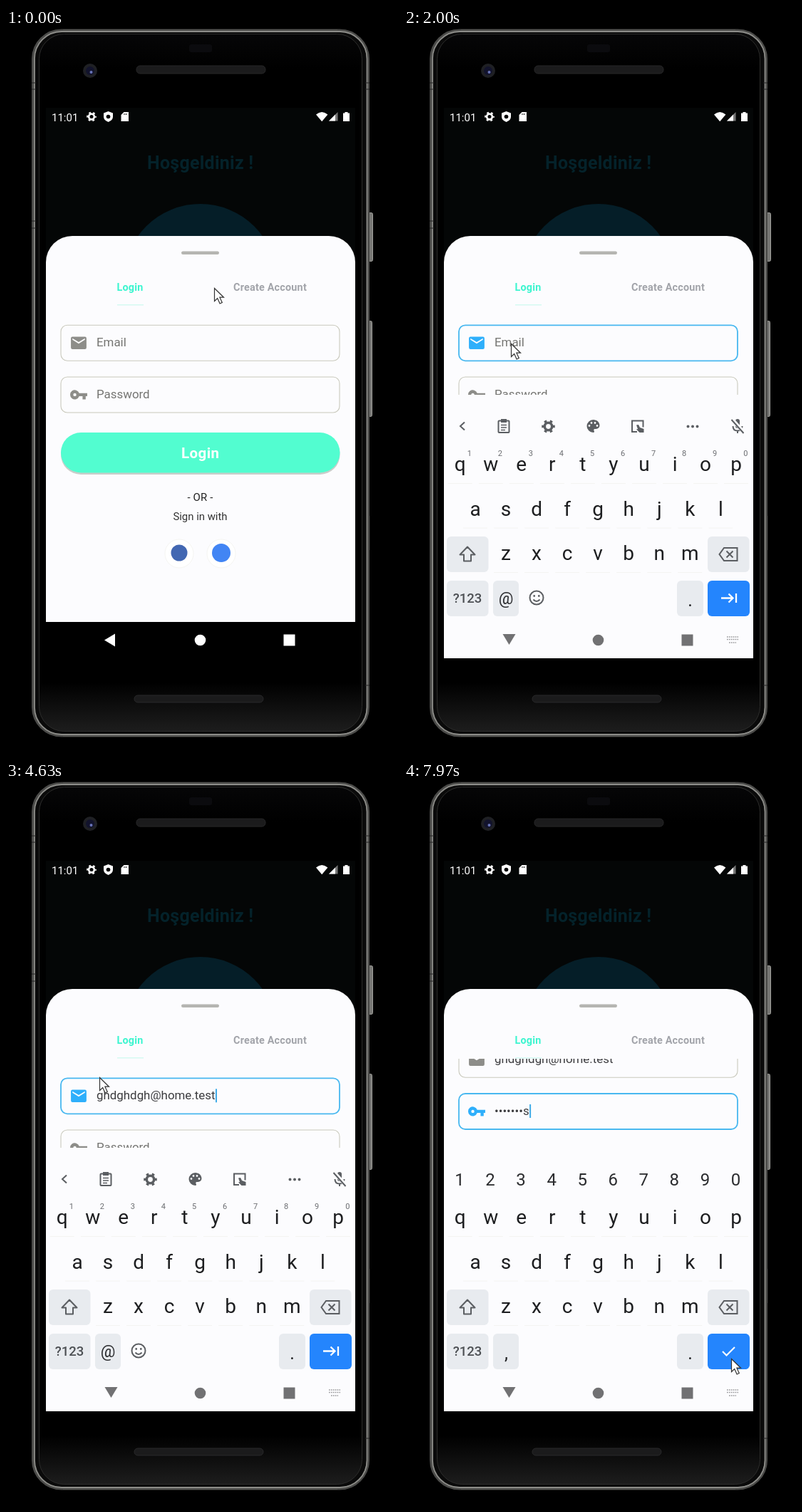
Recreate the animation shown at these times as an HTML page. Size 550x1018 px, loop 8000 ms.

```html
<!DOCTYPE html>
<html lang="en">
<head>
<meta charset="utf-8">
<title>Login form</title>
<style>
  html, body { margin: 0; width: 100%; height: 100%; overflow: hidden; background: #000; }
  svg { display: block; width: 550px; height: 1018px; font-family: Roboto, sans-serif; }
  text { white-space: pre; }
  .mid { text-anchor: middle; }
  .tab { font-size: 14.4px; font-weight: 700; letter-spacing: .2px; }
  .input { font-size: 16.9px; }
  .hint { fill: #757572; }
  .typed { fill: #3c3c3f; }
  .key { font-size: 28px; fill: #1d1e20; }
  .digit { font-size: 11px; fill: #6a6c70; }
  .num { font-size: 24px; fill: #2b2c2f; }
  .line { fill: none; stroke: #5b5e62; stroke-width: 2; }
</style>
</head>
<body>
<svg viewBox="0 0 550 1018">
  <defs>
    <linearGradient id="glass" x1="0" y1="0" x2="0" y2="1">
      <stop offset="0" stop-color="#060607"/><stop offset=".05" stop-color="#000"/>
      <stop offset=".93" stop-color="#000"/><stop offset="1" stop-color="#1d1d1d"/>
    </linearGradient>
    <clipPath id="screen"><rect x="56" y="112" width="434" height="773"/></clipPath>
    <clipPath id="form"><rect x="56" y="390" width="434" height="444"/></clipPath>
    <path id="mail" d="M20 4H4a2 2 0 0 0-2 2v12a2 2 0 0 0 2 2h16a2 2 0 0 0 2-2V6a2 2 0 0 0-2-2zm0 4l-8 5-8-5V6l8 5 8-5z"/>
    <path id="lock" d="M12.65 10A6 6 0 1 0 12.65 14H17v4h4v-4h2v-4zM7 14a2 2 0 1 1 0-4 2 2 0 0 1 0 4z"/>
    <g id="gear" fill="none" stroke="currentColor">
      <circle r="5.2" stroke-width="3.6"/>
      <circle r="7.8" stroke-width="3" pathLength="12" stroke-dasharray=".9 1.1" stroke-dashoffset=".45"/>
    </g>
  </defs>

  <!-- phone -->
  <g fill="#777774" stroke="#a2a29e">
    <rect x="508.500" y="259.500" width="6" height="68" rx="2"/>
    <rect x="508.500" y="411.500" width="5" height="134" rx="2"/>
    <rect x="508" y="685" width="2.500" height="48" fill="#2a2a2a" stroke="none"/>
  </g>
  <rect x="38" y="3.500" width="470" height="990" rx="40" fill="#0a0a0a" stroke="#4b4b49" stroke-width="4"/>
  <rect x="40" y="5" width="466.500" height="987" rx="38" fill="none" stroke="#8d8d89" stroke-width="1.800"/>
  <rect x="46.500" y="8.500" width="453" height="979" rx="35" fill="url(#glass)" stroke="#2c2c2b"/>
  <path d="M80 2.500H465M80 994.500H465" stroke="#5a5a57"/>
  <path d="M36 77h6M36 86h6M36 271h6M36 281h6M504 77h6M504 86h6M504 923h6" stroke="#222"/>
  <rect x="257" y="23" width="32" height="11" rx="3" fill="#0b0b0e"/>
  <rect x="183" y="53" width="181" height="11" rx="5" fill="#1b1b1c" stroke="#262627"/>
  <rect x="180" y="937" width="181" height="10" rx="5" fill="#1b1b1c" stroke="#29292a"/>
  <circle cx="118" cy="60" r="10" fill="#1f2024"/>
  <circle cx="118" cy="60" r="6" fill="#12132c"/>
  <circle cx="119.500" cy="62" r="2" fill="#6874b8"/>

  <g clip-path="url(#screen)">
    <rect x="56" y="112" width="434" height="773"/>
    <rect x="56" y="112" width="434" height="240" fill="#040606"/>
    <!-- status bar -->
    <g fill="#fff" color="#fff">
      <text x="64" y="130.500" font-size="15">11:01</text>
      <use href="#gear" transform="translate(120 124.500) scale(.74)"/>
      <path d="M143.500 117l6.500 2.500v5q0 5-6.500 7.500q-6.500-2.500-6.500-7.500v-5z"/>
      <circle cx="143.500" cy="124.500" r="2.800" fill="#000"/>
      <path d="M165.500 118h6.500v13h-10.500v-9z"/>
      <path d="M166 120v2M168.500 120v2" stroke="#000"/>
      <path d="M435 121.500q8.200-7 16.400 0l-8.200 9.700z"/>
      <path d="M453 130.500h12.500V118z" fill="#777"/><path d="M453 130.500h9V121.500z"/>
      <path d="M473 119.500h2.500V118h4v1.500h2.500V131h-9z"/>
    </g>
    <text class="mid" x="272.700" y="198" font-size="25" font-weight="700" letter-spacing=".25" fill="#04222a">Hoşgeldiniz !</text>
    <circle cx="272.500" cy="354" r="107" fill="#051e28"/>

    <!-- sheet -->
    <path d="M56 834V329a37 37 0 0 1 37-37H453a37 37 0 0 1 37 37V834z" fill="#fcfcfe"/>
    <rect x="246" y="313.500" width="53" height="4.500" rx="2.200" fill="#b5b5b1"/>
    <text class="tab mid" x="174" y="369" fill="#3cf5cf">Login</text>
    <text class="tab mid" x="370.500" y="369" fill="#a2a4aa">Create Account</text>
    <rect x="156" y="388" width="37" height="1.500" fill="#d5faf2"/>
    <g clip-path="url(#form)"><g id="scroll">
      <g id="email"></g>
      <g id="pass"></g>
      <rect x="77" y="571" width="391.500" height="56" rx="28" fill="#c9cdca"/>
      <rect x="77" y="568" width="391.500" height="56.500" rx="28.200" fill="#52fdd0"/>
      <text class="mid" x="272.700" y="603.500" font-size="20.500" font-weight="700" letter-spacing=".4" fill="#fff">Login</text>
      <text class="mid" x="272.500" y="663.500" font-size="14.900" letter-spacing=".2" fill="#222">- OR -</text>
      <text class="mid" x="272.500" y="691" font-size="14.900" fill="#333">Sign in with</text>
      <g fill="#fff" stroke="#f5f5f2"><circle cx="243" cy="738" r="20"/><circle cx="302" cy="738" r="20"/></g>
      <circle cx="243" cy="737" r="11.500" fill="#4267b2"/>
      <circle cx="302" cy="737" r="13" fill="#4285f4"/>
    </g></g>

    <!-- keyboard -->
    <rect id="navBack" x="56" y="834" width="434" height="51" fill="#fcfcfe"/>
    <g id="board">
      <rect x="56" y="515" width="434" height="380" fill="#fcfcfe"/>
      <g id="letters"></g>
      <path class="line" d="M89 728.500l-10.500 11h5.500v9h10v-9h5.500z" stroke-linejoin="round"/>
      <path class="line" d="M449 730h18.500v18H449l-6.500-9zM452.500 734.500l9 9m0-9l-9 9"/>
      <text class="mid" x="89" y="807" font-size="18.500" font-weight="500" fill="#4d5054">?123</text>
      <text class="mid key" x="401.500" y="812" style="font-size:25px">.</text>

      <g id="mailKeys">
        <path class="line" d="M85 553.500l-6 5.500 6 5.500"/>
        <g class="line" transform="translate(140 559)">
          <rect x="-7.500" y="-7.500" width="15" height="16.500" rx="1"/>
          <path d="M-4-1.500H4M-4 2H4M-4 5.500H2" stroke-width="1.600"/>
          <path d="M-4-7.500H4" stroke-width="5"/>
        </g>
        <use href="#gear" color="#5b5e62" transform="translate(202.500 559.500)"/>
        <g transform="translate(253.500 547)">
          <path d="M12 3a9 9 0 0 0 0 18q1.500 0 1.500-1.500l-.4-1a1.500 1.500 0 0 1 1.100-2.500H16a5 5 0 0 0 5-5c0-4.400-4-8-9-8z" fill="#5b5e62"/>
          <path d="M6.500 11.500h0M9.500 7.500h0M14.500 7.500h0M17.500 11.500h0" stroke="#fcfcfe" stroke-width="2.800" stroke-linecap="round"/>
        </g>
        <path class="line" d="M327 567h-7v-15.500h15.500v9"/>
        <path d="M326 557.500l3-.5 2 4 5.500 2v5h-6l-4.500-4.500 2-.5z" fill="#5b5e62"/>
        <path d="M398.500 559.500h0M405 559.500h0M411.500 559.500h0" stroke="#5b5e62" stroke-width="4" stroke-linecap="round"/>
        <g class="line">
          <path d="M468 552v7" stroke-width="6" stroke-linecap="round"/>
          <path d="M461.500 559q0 6.500 6.500 6.500t6.500-6.500M468 565v4"/>
          <path d="M460 549l17 19" stroke="#fcfcfe" stroke-width="5"/><path d="M459.500 550l17 19"/>
        </g>
        <text class="mid" x="143" y="809" font-size="23" fill="#2b2c2f">@</text>
        <g class="line">
          <circle cx="186" cy="800" r="9.500"/><path d="M181.500 802.500q4.500 5 9 0"/>
          <path d="M182.700 797.500h0M189.300 797.500h0" stroke-width="2.800" stroke-linecap="round"/>
        </g>
        <path d="M445 800.500h16M455.500 794.500l6 6-6 6M466 794v13" fill="none" stroke="#fff" stroke-width="2.300"/>
      </g>
      <g id="passKeys">
        <text class="mid key" x="143.500" y="812" style="font-size:25px">,</text>
        <path d="M447 801l5.500 5.500L464 795" fill="none" stroke="#fff" stroke-width="2.200"/>
      </g>
    </g>

    <!-- navigation -->
    <g id="nav">
      <path id="back" d="M138 859.500l15-9v18z"/>
      <circle cx="272.500" cy="859.500" r="7.800"/>
      <rect x="389.500" y="851.500" width="16" height="16"/>
      <path id="switcher" d="M453 855h16M453 858.500h16M456 863h10" stroke="#98989a" stroke-width="1.700" stroke-dasharray="1.700 1.200"/>
    </g>
  </g>
  <path id="pointer" d="M.5.500v18l4.200-4 3.400 7.500 3.200-1.500-3.400-7.300h5.600z" fill="#fff" stroke="#333" stroke-width="1.200"/>
</svg>

<script>
const LOOP = 8000;
const MAIL = 'ghdghdgh@home.test', PASS = 'asdasdas';
const FOCUS_MAIL = 1000, BOARD_IN = 1066, BOARD_MS = 285, BOARD_SWAP = 5760, FOCUS_PASS = 5840;
const TYPE_MAIL = 3480, MAIL_STEP = 62, TYPE_PASS = 6530, PASS_STEP = 196;

// time, x, y of the pointer tip
const PATH = [
  [0, 292, 365], [130, 292, 365], [850, 163, 442], [1230, 161, 441], [1800, 150, 443],
  [3900, 150, 443], [4300, 131, 416], [4750, 131, 416], [5500, 452, 816],
  [7200, 452, 816], [7700, 459, 811], [LOOP, 459, 811]
];

const $ = id => document.getElementById(id);
const clamp = v => Math.max(0, Math.min(1, v));
const span = (t, from, ms) => clamp((t - from) / ms);
const easeOut = p => 1 - (1 - p) ** 3;
const smooth = p => p * p * (3 - 2 * p);
const show = (el, on) => el.setAttribute('visibility', on ? 'visible' : 'hidden');

function buildKeys() {
  const step = 43.05;
  const label = (cls, x, y, s) => `<text class="mid ${cls}" x="${x}" y="${y}">${s}</text>`;
  const pad = (x, y, w, fill = '#e8ebef') =>
    `<rect x="${x}" y="${y}" width="${w}" height="50" rx="6" fill="${fill}"/>`;
  let keys = '', digits = '', numbers = '';
  [['qwertyuiop', 78.7, 622], ['asdfghjkl', 100, 684.5], ['zxcvbnm', 143, 747]].forEach(([row, x0, y]) => {
    [...row].forEach((ch, i) => {
      const x = x0 + i * step;
      keys += label('key', x, y, ch) +
        `<path d="M${x - 17} ${y + 17.5}h34" stroke="#f4f4f1"/>`;
    });
  });
  for (let i = 0; i < 10; i++) {
    const n = (i + 1) % 10;
    digits += label('digit', 91.8 + i * step, 601, n);
    numbers += label('num', 78 + i * step, 568, n);
  }
  $('letters').innerHTML = keys +
    pad(60, 714, 58.5) + pad(426, 714, 58.5) + pad(60, 776, 58.5) + pad(125, 776, 36) +
    pad(383, 776, 37) + pad(426, 776, 59, '#2485fd');
  $('mailKeys').insertAdjacentHTML('afterbegin', digits);
  $('passKeys').insertAdjacentHTML('afterbegin', numbers);
}

function makeField(id, top, icon, hint) {
  const g = $(id);
  g.innerHTML = `<rect x="77" y="${top}" width="391" height="50" rx="9" fill="none"/>
    <use href="#${icon}" transform="translate(88.9 ${top + 11.8}) scale(1.09)"/>
    <text class="input hint" x="127" y="${top + 30}">${hint}</text>
    <text class="input typed" x="127" y="${top + 30}"></text>
    <rect y="${top + 15}" width="2" height="19" fill="#3fabe8"/>`;
  const [box, mark, ghost, typed, caret] = g.children;
  return (text, focused, hintAlpha, caretOn) => {
    box.setAttribute('stroke', focused ? '#48b8f0' : '#c9c9bc');
    box.setAttribute('stroke-width', focused ? 1.8 : 1.1);
    mark.setAttribute('fill', focused ? '#2eaffb' : '#8d8d89');
    ghost.setAttribute('opacity', hintAlpha);
    if (typed.textContent !== text) typed.textContent = text;
    caret.setAttribute('x', 127.5 + (text ? typed.getComputedTextLength() : 0));
    show(caret, focused && caretOn);
  };
}

buildKeys();
const drawMail = makeField('email', 417.3, 'mail', 'Email');
const drawPass = makeField('pass', 490, 'lock', 'Password');

const typedCount = (t, from, step, max) =>
  t < from ? 0 : Math.min(max, Math.floor((t - from) / step) + 1);

// The caret restarts its blink at every key stroke.
function blink(t, focusAt, from, step, count) {
  const since = count ? from + (count - 1) * step : focusAt;
  return (t - since) % 1000 < 500;
}

function pointerAt(t) {
  const i = Math.max(1, PATH.findIndex(p => p[0] > t));
  const [t0, x0, y0] = PATH[i - 1], [t1, x1, y1] = PATH[i];
  const p = smooth(span(t, t0, t1 - t0));
  return [x0 + (x1 - x0) * p, y0 + (y1 - y0) * p];
}

function render(t) {
  const open = easeOut(span(t, BOARD_IN, BOARD_MS));
  const up = t >= BOARD_IN, swapped = t >= BOARD_SWAP;
  $('board').setAttribute('transform', `translate(0 ${370 * (1 - open)})`);
  show($('board'), up);
  show($('navBack'), up);
  show($('switcher'), up);
  show($('mailKeys'), up && !swapped);
  show($('passKeys'), up && swapped);
  $('nav').setAttribute('fill', up ? '#717173' : '#fff');
  const turn = smooth(span(t, BOARD_IN, 225));
  $('back').setAttribute('transform', `rotate(${-90 * turn} 146 858)`);

  const shift = 50 * easeOut(span(t, FOCUS_PASS, 200)) + span(t, 6600, 60);
  $('scroll').setAttribute('transform', `translate(0 ${-shift})`);

  const onPass = t >= FOCUS_PASS;
  const m = typedCount(t, TYPE_MAIL, MAIL_STEP, MAIL.length);
  drawMail(MAIL.slice(0, m), t >= FOCUS_MAIL && !onPass,
    1 - span(t, TYPE_MAIL, 80), blink(t, 1150, TYPE_MAIL, MAIL_STEP, m));

  const n = typedCount(t, TYPE_PASS, PASS_STEP, PASS.length);
  drawPass(n ? '•'.repeat(n - 1) + PASS[n - 1] : '', onPass,
    1 - span(t, TYPE_PASS - 20, 100), blink(t, FOCUS_PASS, TYPE_PASS, PASS_STEP, n));

  $('pointer').setAttribute('transform', `translate(${pointerAt(t)})`);
}

const start = performance.now();
function tick() {
  render((performance.now() - start) % LOOP);
  requestAnimationFrame(tick);
}
tick();
</script>
</body>
</html>
```
